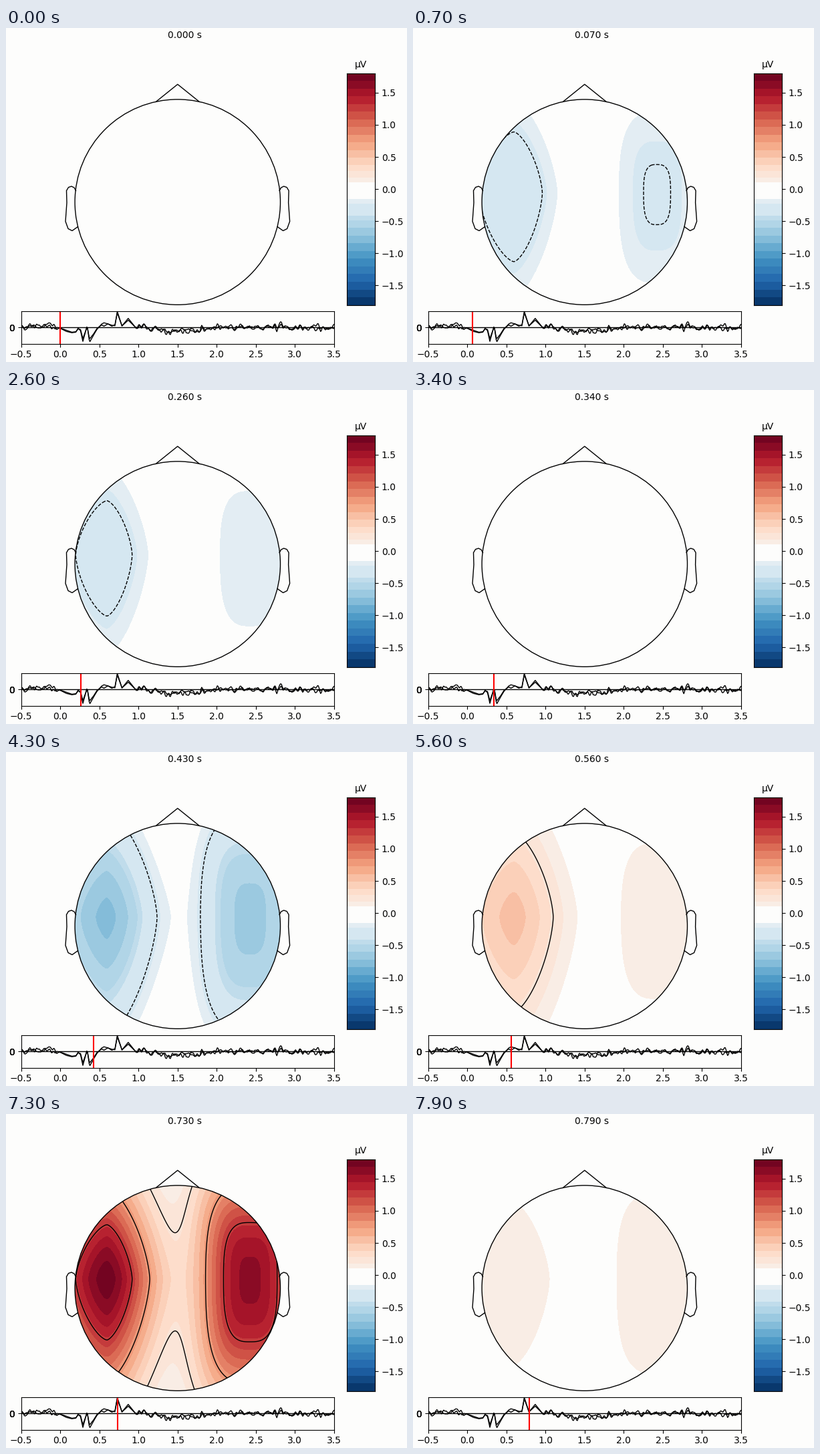
A matplotlib script for the animation above (8 s loop, 600x500 px).

```python
import numpy as np
import matplotlib.pyplot as plt
from matplotlib.animation import FuncAnimation
from matplotlib.patches import Circle

W, H, DPI = 600, 500, 100
FRAMES, INTERVAL = 80, 100
BG = "#fdfdfc"
VMAX = 1.805
CX, CY, RADIUS = 256.8, 260.6, 153.7

plt.rcParams.update({"font.family": "DejaVu Sans", "font.size": 10})

# Colour bands: even steps when strong, a wide white band around zero
STRONG = np.arange(0.485, VMAX + 0.01, 0.12)
LEVELS = np.r_[-STRONG[::-1], -0.42, -0.225, -0.16, 0.1, 0.18, 0.28, 0.38, STRONG]
MIDS = (LEVELS[:-1] + LEVELS[1:]) / 2
COLORS = plt.cm.RdBu_r(0.5 + MIDS / (2 * VMAX))
COLORS[np.abs(MIDS) < 0.1] = plt.matplotlib.colors.to_rgba(BG)
LINES = np.linspace(-VMAX, VMAX, 8)

# Key points of the response: time, left sensor, right sensor
KEYS = np.array([
    (0.00, -0.08, -0.05), (0.08, -0.42, -0.30), (0.15, -0.56, -0.505),
    (0.20, -0.50, -0.45), (0.23, -0.05, -0.15), (0.26, -0.35, -0.215),
    (0.29, -1.50, -1.20), (0.345, 0.22, 0.10), (0.375, -1.60, -1.25),
    (0.43, -0.76, -0.645), (0.47, -0.20, -0.10), (0.53, 0.38, 0.28),
    (0.56, 0.52, 0.15), (0.61, 0.40, 0.40), (0.66, 0.25, 0.15),
    (0.70, 0.20, 0.30), (0.73, 1.75, 1.60), (0.79, 0.178, 0.178),
    (0.87, 1.00, 0.80), (0.96, 0.05, 0.05),
])


def make_traces():
    rng = np.random.default_rng(11)
    t = np.arange(-50, 351) / 100
    active = (t >= 0) & (t <= KEYS[-1, 0])
    drift = 0.3 * np.exp(-((t + 0.25) / 0.12) ** 2) - 0.4 * np.exp(-((t - 1.55) / 0.3) ** 2)
    shared = rng.normal(size=t.size)
    kernel = np.array([1, 2, 2, 1]) / 6
    traces = []
    for values in KEYS[:, 1:].T:
        noise = np.convolve(0.8 * shared + rng.normal(size=t.size), kernel, "same")
        response = np.interp(t, KEYS[:, 0], values)
        traces.append(np.where(active, response, drift + 0.25 * noise))
    return t, traces


def bump(x, y, x0, y0, left, right, up, down, power, fall):
    dx, dy = x - x0, y - y0
    a = np.abs(dx) / np.where(dx < 0, left, right)
    b = np.abs(dy) / np.where(dy < 0, up, down)
    return np.exp(-(a ** power + b ** power) ** fall)


times, (left_trace, right_trace) = make_traces()
gx, gy = np.meshgrid(np.linspace(100, 414, 190), np.linspace(104, 418, 190))
left_map = bump(gx, gy, 151, 247, 88, 71, 153, 172, 1.5, 1.25)
right_map = bump(gx, gy, 365, 247, 74, 77, 160, 178, 3, 0.8)

fig = plt.figure(figsize=(W / DPI, H / DPI), dpi=DPI, facecolor=BG)


def pixel_axes(x0, y0, x1, y1):
    ax = fig.add_axes([x0 / W, 1 - y1 / H, (x1 - x0) / W, (y1 - y0) / H])
    ax.set_facecolor(BG)
    return ax


# Head
head = pixel_axes(0, 0, W, H)
head.set_xlim(0, W)
head.set_ylim(H, 0)
head.axis("off")
outline = Circle((CX, CY), RADIUS, fill=False, ec="k", lw=1, zorder=5)
head.add_patch(outline)
ear_x = np.array([104.5, 102, 98, 93.5, 90.5, 91, 89, 93, 99, 107.5])
ear_y = np.array([243.5, 239, 237, 238.5, 243.5, 261.5, 289.5, 300.5, 303.5, 297.5])
nose = ([CX - 32.3, CX, CX + 32.3], [110.3, 84.3, 110.3])
for x, y in (nose, (ear_x, ear_y), (2 * CX - ear_x, ear_y)):
    head.plot(x, y, "k", lw=1, zorder=5)
title = head.text(267.5, 15, "", ha="center", va="baseline")

# Colour bar
bar = pixel_axes(510.2, 67.6, 552.2, 414.6)
bar.pcolormesh([0, 1], LEVELS, MIDS[:, None], cmap=plt.matplotlib.colors.ListedColormap(COLORS),
               norm=plt.matplotlib.colors.BoundaryNorm(LEVELS, len(COLORS)))
bar.set_ylim(-VMAX, VMAX)
bar.set_xticks([])
bar.yaxis.tick_right()
bar.set_yticks(np.arange(-1.5, 1.6, 0.5))
bar.yaxis.set_major_formatter("{x:.1f}")
head.text(531, 59, "μV", ha="center", va="baseline")

# Time course
course = pixel_axes(22.6, 423.6, 490.6, 472.6)
course.set_xlim(-0.5, 3.5)
course.set_ylim(-1.75, 1.8)
course.set_xticks(np.arange(-0.5, 3.6, 0.5))
course.xaxis.set_major_formatter("{x:.1f}")
course.set_yticks([0], [""])
for _ in range(3):
    head.text(13, 449, "0", ha="right", va="center_baseline")
for trace in (left_trace, right_trace):
    course.plot(times, trace, "k", lw=1)
course.axhline(0, color="k", lw=1)
cursor = course.axvline(0, color="red", lw=1.5, zorder=2.4)

drawn = []


def draw(i):
    while drawn:
        drawn.pop().remove()
    k = int(np.argmin(np.abs(times - i / 100)))
    field = left_trace[k] * left_map + right_trace[k] * right_map
    field = np.clip(field, -VMAX + 1e-3, VMAX - 1e-3)
    drawn.append(head.contourf(gx, gy, field, levels=LEVELS, colors=COLORS, zorder=1))
    visible = [v for v in LINES if field.min() < v < field.max()]
    if visible:
        drawn.append(head.contour(gx, gy, field, levels=visible, colors="k",
                                  linewidths=1, zorder=2))
    for contours in drawn:
        contours.set_clip_path(outline)
    title.set_text(f"{i / 100:.3f} s")
    cursor.set_xdata([i / 100, i / 100])
    return [title, cursor]


anim = FuncAnimation(fig, draw, frames=FRAMES, interval=INTERVAL,
                     repeat=True, blit=False)
plt.show()
```
